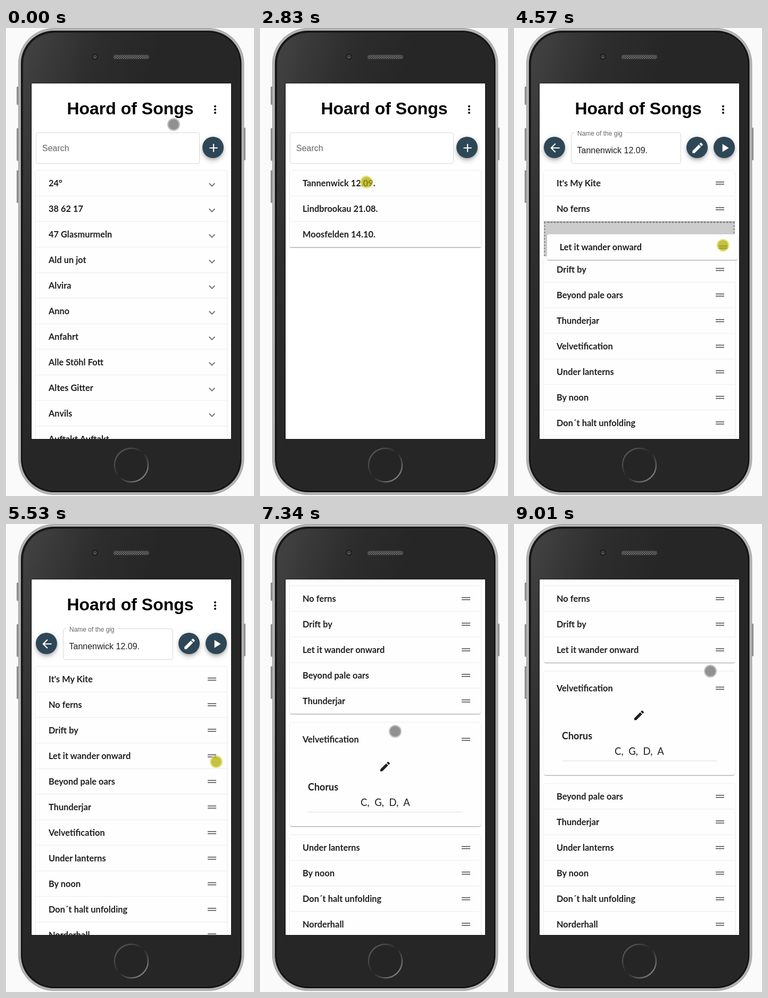
An HTML page for the animation above (9.21 s loop, 466x878 px).

```html
<!DOCTYPE html>
<html lang="en">
<head>
<meta charset="utf-8">
<title>Song list demo</title>
<style>
html, body { margin: 0; width: 100%; height: 100%; overflow: hidden; background: #fafafa; }
body { position: relative; font-family: "Liberation Sans", Arial, sans-serif; color: #1f1f1f; }
div, svg { position: absolute; }
#screen { left: 48px; top: 104px; width: 375px; height: 667px; overflow: hidden; background: #fff; }
#scroll { left: -48px; top: -104px; width: 466px; height: 878px; }
.text { line-height: 24px; white-space: pre; }
.title { left: 48px; width: 371px; top: 131px; line-height: 40px; text-align: center; font-size: 32px; font-weight: 700; color: #000; }
.field { top: 196px; height: 57px; border: 1px solid #d8d8d8; border-radius: 4px; }
.fab { width: 40px; height: 40px; top: 204px; border-radius: 50%; background: #2e4756;
  box-shadow: 0 3px 5px -1px rgba(0,0,0,.2), 0 6px 10px rgba(0,0,0,.14), 0 1px 12px rgba(0,0,0,.1); }
.fab svg { width: 26px; height: 26px; }
.row { left: 56px; width: 359px; height: 48px; background: #fefefe; overflow: visible;
  box-shadow: 0 2px 1px -1px rgba(0,0,0,.2), 0 1px 1px rgba(0,0,0,.14), 0 1px 3px rgba(0,0,0,.12); }
.row::before { content: ""; position: absolute; left: 0; right: 0; top: -1px; height: 2px; background: #f5f5f5; }
.row.held::before { display: none; }
.row .text { font: 700 16.4px/24px Lato, sans-serif; left: 24px; }
.detail { left: 0; top: 0; width: 359px; height: 100%; overflow: hidden; opacity: 0; }
.detail .part { left: 34px; font-size: 18px; }
.detail .chords { left: 0; width: 359px; text-align: center; font-weight: 400; font-size: 18.6px; }
.rule { left: 34px; width: 291px; top: 168px; height: 1px; background: #dedede; }
#slot { left: 56px; width: 359px; box-sizing: border-box; background: #ccc; border: 3px dotted #999; }
#menu { left: 289px; top: 171px; width: 126px; height: 305px; background: #fff; border-radius: 4px;
  box-shadow: 0 2px 5px rgba(0,0,0,.4), 0 1px 2px rgba(0,0,0,.15); transform-origin: 100% 0; z-index: 30; }
#menu .text { left: 60px; font-size: 14px; }
#cursor { left: -12px; top: -12px; width: 20px; height: 20px; border-radius: 50%; border: 2px solid; background-clip: padding-box; }
</style>
</head>
<body>
<svg width="466" height="878" viewBox="0 0 466 878">
  <defs>
    <linearGradient id="body" x1="0" y1="0" x2=".45" y2=".3">
      <stop offset="0" stop-color="#444"/><stop offset=".55" stop-color="#2d2d2d"/><stop offset="1" stop-color="#262626"/>
    </linearGradient>
    <linearGradient id="ring" x1="0" y1="0" x2="1" y2="1">
      <stop offset=".05" stop-color="#626262"/><stop offset=".5" stop-color="#232323"/><stop offset=".95" stop-color="#929292"/>
    </linearGradient>
    <pattern id="mesh" width="4" height="4" patternUnits="userSpaceOnUse">
      <path d="M0 0h4v4H0z" fill="#2c2c2c"/><path d="M0 0h2v2H0zM2 2h2v2H2z" fill="#777"/>
    </pattern>
  </defs>
  <g fill="#8d8d8d">
    <rect x="20" y="110" width="5" height="34" rx="1"/><rect x="20" y="188" width="5" height="61" rx="1"/>
    <rect x="20" y="267" width="5" height="61" rx="1"/><rect x="445" y="187" width="5" height="61" rx="1"/>
  </g>
  <rect x="23.5" y=".5" width="423.500" height="875" rx="67" fill="#b3b3b3" stroke="#a2a2a2"/>
  <rect x="28" y="5" width="414.500" height="866" rx="62" fill="#161616"/>
  <rect x="32" y="9" width="406.500" height="858" rx="58" fill="url(#body)" stroke="#303030"/>
  <circle cx="167" cy="54" r="7" fill="#1b1b1b" stroke="#3c3c3c"/>
  <circle cx="167" cy="54" r="3.5" fill="#30303a" stroke="#555"/>
  <circle cx="167" cy="55" r="1" fill="#888"/>
  <rect x="202" y="50.500" width="67" height="7.500" rx="3.700" fill="url(#mesh)" stroke="#444" stroke-width=".6"/>
  <circle cx="235.500" cy="820" r="31.500" fill="#252525" stroke="url(#ring)" stroke-width="2.500"/>
  <rect x="47" y="103.500" width="376.500" height="668" fill="#000"/>
</svg>
<div id="screen"><div id="scroll">
  <div class="title">Hoard of Songs</div>
  <div id="songs"></div>
  <div id="gigs"></div>
  <div id="gig"><div id="slot"></div></div>
  <div id="menu"></div>
</div></div>
<div id="cursor"></div>
<script>
const $ = id => document.getElementById(id);
const LOOP = 9210, STEP = 70, TOP = 267, ROW = 48;

const ICON = {
  more: '<circle cx="12" cy="6" r="2"/><circle cx="12" cy="12" r="2"/><circle cx="12" cy="18" r="2"/>',
  down: '<path d="M16.600 8.600L12 13.200 7.400 8.600 6 10l6 6 6-6z"/>',
  grip: '<path d="M4 9h16v2H4zM4 13h16v2H4z"/>',
  add: '<path d="M19 13h-6v6h-2v-6H5v-2h6V5h2v6h6z"/>',
  back: '<path d="M20 11H7.800l5.600-5.600L12 4l-8 8 8 8 1.400-1.400L7.800 13H20z"/>',
  play: '<path d="M8 5v14l11-7z"/>',
  edit: '<path d="M3 17.200V21h3.800L17.800 9.900 14.100 6.200zM20.700 7a1 1 0 0 0 0-1.400L18.400 3.300a1 1 0 0 0-1.400 0L15.100 5.100l3.800 3.800z"/>',
  note: '<path d="M12 3v10.500A4 4 0 1 0 14 17V7h4V3z"/>',
  queue: '<path d="M3 6h12v2H3zM3 10h12v2H3zM3 14h8v2H3zM17 6v8.200A3 3 0 1 0 19 17V8h3V6z"/>',
  group: '<circle cx="8" cy="8" r="3"/><circle cx="16" cy="8" r="3"/><path d="M8 13c-2.300 0-7 1.200-7 3.500V19h14v-2.500C15 14.200 10.300 13 8 13zM15 13c1.200.9 2 2 2 3.500V19h6v-2.500c0-2.600-5-3.700-8-3.500z"/>',
  gear: '<g fill="none" stroke="#757575"><circle cx="12" cy="12" r="5.300" stroke-width="4"/><circle cx="12" cy="12" r="8.300" stroke-width="3" stroke-dasharray="4.600 4.090" transform="rotate(14 12 12)"/></g>',
  out: '<path d="M17 7l-1.400 1.400L18.200 11H8v2h10.200l-2.600 2.600L17 17l5-5zM4 5h8V3H4a2 2 0 0 0-2 2v14a2 2 0 0 0 2 2h8v-2H4z"/>',
  save: '<path d="M19 12v7H5v-7H3v7a2 2 0 0 0 2 2h14a2 2 0 0 0 2-2v-7zM13 12.700l2.600-2.600L17 11.500l-5 5-5-5 1.400-1.400 2.600 2.600V3h2z"/>'
};
const icon = (name, x, y, color = '#757575') =>
  `<svg width="24" height="24" viewBox="0 0 24 24" style="left:${x}px;top:${y}px" fill="${color}">${ICON[name]}</svg>`;
const text = (s, x, y, style = '') =>
  `<div class="text" style="left:${x}px;top:${y - 12}px;${style}">${s}</div>`;
const fab = (name, x) => `<div class="fab" style="left:${x}px">${icon(name, 7.5, 8, '#fff')}</div>`;
const field = (x, w) => `<div class="field" style="left:${x}px;width:${w - 2}px"></div>`;
const add = (id, html) => $(id).insertAdjacentHTML('beforeend', html);
const rows = (names, mark) => names.map((n, i) =>
  `<div class="row" style="top:${TOP + i * ROW}px"><div class="text" style="top:12px">${n}</div>${mark}</div>`).join('');

const search = field(56, 308) + text('Search', 68, 226, 'font-size:16px;color:#666') + fab('add', 369);
add('scroll', icon('more', 381, 141, '#000'));
add('songs', search + rows(['24°', '38 62 17', '47 Glasmurmeln', 'Ald un jot', 'Alvira', 'Anno', 'Anfahrt',
  'Alle Stöhl Fott', 'Altes Gitter', 'Anvils', 'Auftakt Auftakt'], icon('down', 319, 15)));
add('gigs', search + rows(['Tannenwick 12.09.', 'Lindbrookau 21.08.', 'Moosfelden 14.10.'], ''));
add('gig', fab('back', 56) + field(107, 207) +
  text('Name of the gig', 114, 198, 'font-size:12px;color:#666;background:#fff;padding:0 5px') +
  text('Tannenwick 12.09.', 118.5, 230, 'font-size:16px') + fab('edit', 324) + fab('play', 375));
add('gig', rows(['Let it wander onward', "It's My Kite", 'No ferns', 'Drift by', 'Beyond pale oars', 'Thunderjar',
  'Velvetification', 'Under lanterns', 'By noon', 'Don´t halt unfolding', 'Norderhall', 'Solavernia',
  'Ein Kieselbett', 'Whistling At Meadow Gate', 'Ninth Turnstile'], icon('grip', 319, 12)));
[['note', 'Songs'], ['queue', 'Gigs'], ['group', 'Band'], ['gear', 'Settings'], ['out', 'Logout'], ['save', 'Install']]
  .forEach(([name, label], i) => add('menu', icon(name, 16, 21 + i * ROW) + text(label, 60, 33 + i * ROW)));

const cards = [...$('gig').querySelectorAll('.row')];
const OPEN = 6;
cards[OPEN].insertAdjacentHTML('beforeend', '<div class="detail">' + icon('edit', 167, 71, '#1f1f1f') +
  '<div class="text part" style="top:109px">Chorus</div>' +
  '<div class="text chords" style="top:138px">C,  G,  D,  A</div><div class="rule"></div></div>');
const detail = cards[OPEN].querySelector('.detail');

// Runs of even steps: first and last change
const RUNS = [[0, 0], [460, 2490], [2690, 3670], [3870, 4990], [5250, 6090], [6150, 8670], [8870, 9010]];
function snap(t) {
  const [a, b] = RUNS.filter(r => r[0] <= t).pop();
  return Math.min(b, a + Math.floor((t - a) / STEP) * STEP);
}

const line = u => u, soft = u => u * u * (3 - 2 * u), out = u => 1 - (1 - u) ** 2;
const PATH = [
  [0, 315, 181], [390, 315, 181], [740, 395, 147, soft], [1090, 395, 147], [1370, 388, 192, soft],
  [1650, 383, 249, out], [1790, 383, 249], [2350, 233, 268, soft], [2490, 211, 271, line],
  [2620, 211, 271], [2830, 200, 289, soft], [3040, 202, 289], [3600, 384, 287, soft], [3670, 387, 287, line],
  [3800, 387, 287], [3870, 387, 288, line], [4010, 386, 298, line], [4850, 395, 446, soft], [5250, 395, 446],
  [5530, 395, 446], [5600, 394, 440, line], [6090, 390, 275, soft], [6360, 389, 249, out], [6430, 389, 241, line],
  [6500, 389, 241], [6850, 254, 389, soft], [7340, 254, 389], [7830, 387, 394, soft], [7970, 387, 394],
  [8110, 394, 392, line], [8600, 373, 277, soft], [8670, 372, 275, line], [8870, 371, 275.5, line],
  [9010, 369, 276, line], [LOOP, 369, 276]
];
function pointer(t) {
  const i = Math.max(1, PATH.findIndex(k => k[0] >= t));
  const a = PATH[i - 1], b = PATH[i];
  const u = (b[3] || line)((t - a[0]) / (b[0] - a[0]));
  return [a[1] + (b[1] - a[1]) * u, a[2] + (b[2] - a[2]) * u];
}
const PRESS = [[740, 880], [1650, 1790], [2830, 2970], [3870, 4920], [5320, 6490], [6850, 6930], [7900, 8600]];
const DRAGS = [
  { from: 3940, to: 4920, x: 387, y: 288, at: 0, end: 3 },
  { from: 8040, to: 8600, x: 387, y: 394, at: 6, end: 4 }
];
const ramp = (t, a, b) => Math.min(1, Math.max(0, (t - a) / (b - a)));
const show = (id, on) => $(id).style.visibility = on ? 'visible' : 'hidden';

function move(list, a, b) {
  const copy = list.slice();
  copy.splice(b, 0, copy.splice(a, 1)[0]);
  return copy;
}

function layout(t, x, y) {
  const e = soft(ramp(t, 6910, 7130));
  let order = cards.map((_, i) => i), drag = null, home = 0;
  for (const d of DRAGS) {
    if (t >= d.to + STEP) order = move(order, d.at, d.end);
    else if (t >= d.from && t < d.to) drag = d;
  }
  let held = -1;
  if (drag) {
    held = order[drag.at];
    home = TOP + drag.at * ROW + (held === OPEN ? 16 * e : 0);
    order = move(order, drag.at, Math.max(0, drag.at + Math.round((y - drag.y) / ROW)));
  }
  $('slot').style.display = drag ? 'block' : 'none';
  let top = TOP;
  order.forEach((id, i) => {
    const s = cards[id].style, open = id === OPEN ? e : 0, h = ROW + 147 * open;
    const gap = id === held ? 0 : 16 * open;
    const split = n => n === undefined || n === held || (n === OPEN && e > 0);
    const up = open || split(order[i - 1]) ? 4 : 0, low = open || split(order[i + 1]) ? 4 : 0;
    cards[id].classList.toggle('held', id === held);
    s.height = h + 'px';
    s.borderRadius = id === held ? '4px' : `${up}px ${up}px ${low}px ${low}px`;
    s.zIndex = id === held ? 25 : i + 1;
    if (id === held) {
      $('slot').style.top = top + 'px';
      $('slot').style.height = h + 18 + 'px';
      s.top = home + y - drag.y + 'px';
      s.left = 56 + x - drag.x + 'px';
      top += h + 18;
    } else {
      s.top = top + gap + 'px';
      s.left = '56px';
      top += h + 2 * gap;
    }
  });
  const shift = 8 * e + 'px';
  cards[OPEN].children[0].style.marginTop = shift;
  cards[OPEN].children[1].style.marginTop = shift;
  detail.style.opacity = e;
}

function draw(time) {
  const t = snap(time), [x, y] = pointer(t);
  show('songs', t < 1850);
  show('gigs', t >= 1850 && t < 3040);
  show('gig', t >= 3040);
  layout(t, x, y);

  const grow = out(ramp(t, 860, 1090)), fade = ramp(t, 1780, 1990);
  $('menu').style.opacity = grow * (1 - fade);
  $('menu').style.transform = `scale(${.75 + .25 * grow},${.56 + .44 * grow})`;

  const scrolled = t < 5530 ? 0 : t >= 6430 ? 199 : Math.max(0, 440 - y);
  $('scroll').style.transform = `translateY(${-Math.round(scrolled)}px)`;

  const down = PRESS.some(([a, b]) => t >= a && t < b), c = $('cursor').style;
  c.transform = `translate(${x}px,${y}px)`;
  c.background = down ? 'rgba(174,170,0,.72) padding-box' : 'rgba(126,126,126,.85) padding-box';
  c.borderColor = down ? 'rgba(222,220,70,.7)' : 'rgba(150,150,150,.6)';
}

const begin = performance.now();
function tick(now) {
  draw(Math.max(0, now - begin) % LOOP);
  requestAnimationFrame(tick);
}
draw(0);
requestAnimationFrame(tick);
</script>
</body>
</html>
```
